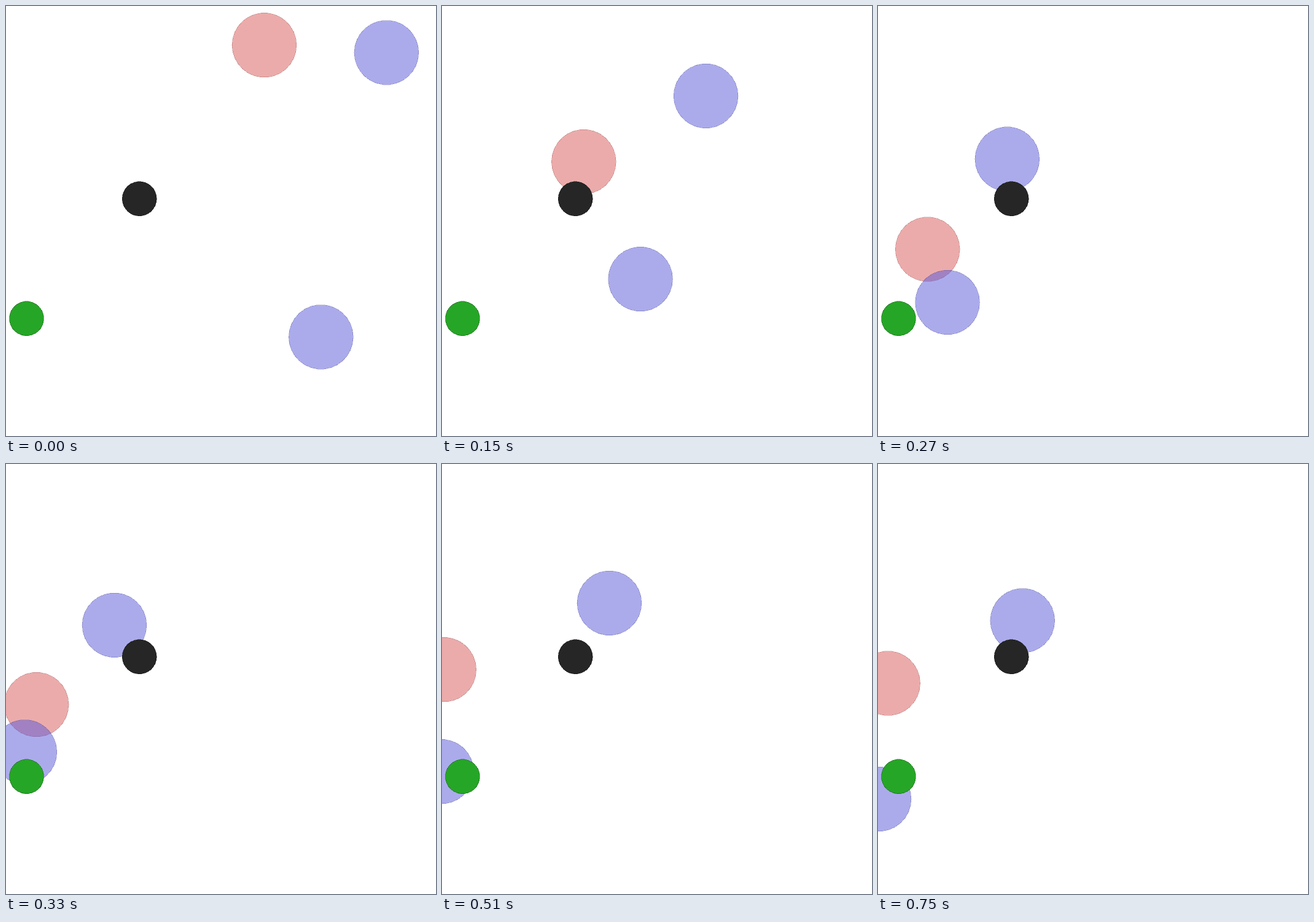
These frames come from a looping animation (700x700 px, 780 ms). An HTML page:

```html
<!DOCTYPE html>
<html lang="en">
<head>
<meta charset="utf-8">
<title>Agents and landmarks</title>
<style>
  html, body { margin: 0; width: 100%; height: 100%; overflow: hidden; background: #fff; }
  svg { display: block; width: 100vw; height: 100vh; shape-rendering: crispEdges; }
</style>
</head>
<body>
<svg id="stage" viewBox="0 0 700 700"></svg>
<script>
const STEP = 30, STEPS = 26;
const DRAG = 0.75, PUSH = 17.5; // speed kept per step, strongest push in px
const RED = [217, 89, 89], BLUE = [89, 89, 217], BLACK = [38, 38, 38], GREEN = [38, 166, 38];
const stage = document.getElementById('stage');

// Each agent starts at rest and passes its key points at these steps
const passes = [5, 9, 13, 17, 21, 25];
const routes = [
  { rgb: RED, x: [420.5, 230.8, 80.7, 26.5, 3.3, 17.2, 16.2],
    y: [63.7, 253.5, 396, 374.5, 334.7, 343.2, 357] },
  { rgb: BLUE, x: [619.4, 429.5, 210.4, 195.2, 272.5, 248.6, 235.3],
    y: [75.8, 146.4, 249.2, 252.8, 226.4, 259.6, 255] },
  { rgb: BLUE, x: [512.8, 323.1, 113.1, -5.5, -0.8, 23.3, 1.6],
    y: [538.8, 444.6, 482.5, 469.6, 500.7, 537.1, 545.5] }
];

const clamp = (v, lim) => Math.max(-lim, Math.min(lim, v));

// Distance gained by step n from a unit push at step k
const reach = (k, n) => n < k ? 0 : (1 - DRAG ** (n - k + 1)) / (1 - DRAG);

// Finds gentle, limited pushes that lead through the points, then runs them
function drive([from, ...points]) {
  const push = Array(STEPS).fill(0);
  const gain = push.map((_, k) => passes.map(n => reach(k, n)));
  const power = gain.map(g => g.reduce((sum, v) => sum + v * v, 0));
  const miss = points.map(p => p - from);
  for (let round = 0; round < 1500; round++) {
    for (let k = 1; k < STEPS; k++) {
      const pull = gain[k].reduce((sum, v, i) => sum + v * miss[i], 0);
      const next = clamp(push[k] + pull / power[k], PUSH);
      const change = next - push[k];
      push[k] = next;
      gain[k].forEach((v, i) => { miss[i] -= v * change; });
    }
  }
  let p = from, v = 0;
  return push.map(a => p += v = v * DRAG + a);
}

function disc(r, rgb, alpha) {
  const el = document.createElementNS('http://www.w3.org/2000/svg', 'polygon');
  const points = Array.from({ length: 30 }, (_, i) => {
    const t = i * Math.PI / 15;
    return (r * Math.cos(t)).toFixed(2) + ',' + (r * Math.sin(t)).toFixed(2);
  });
  el.setAttribute('points', points.join(' '));
  el.setAttribute('fill', `rgb(${rgb})`);
  el.setAttribute('fill-opacity', alpha);
  el.setAttribute('stroke', `rgb(${rgb.map(c => c >> 1)})`);
  el.setAttribute('stroke-opacity', alpha / 2);
  stage.append(el);
  return el;
}

const place = (el, x, y) => el.setAttribute('transform', `translate(${x.toFixed(2)} ${y.toFixed(2)})`);

const agents = routes.map(({ rgb, x, y }) => ({
  el: disc(52.5, rgb, 0.5), x: drive(x), y: drive(y)
}));
place(disc(28, BLACK, 1), 217.2, 313.8);
place(disc(28, GREEN, 1), 33.5, 508.8);

function draw(ms) {
  const i = Math.floor(ms / STEP) % STEPS;
  for (const { el, x, y } of agents) place(el, x[i], y[i]);
}

const start = performance.now();
function tick() {
  draw(performance.now() - start);
  requestAnimationFrame(tick);
}
draw(0);
requestAnimationFrame(tick);
</script>
</body>
</html>
```
